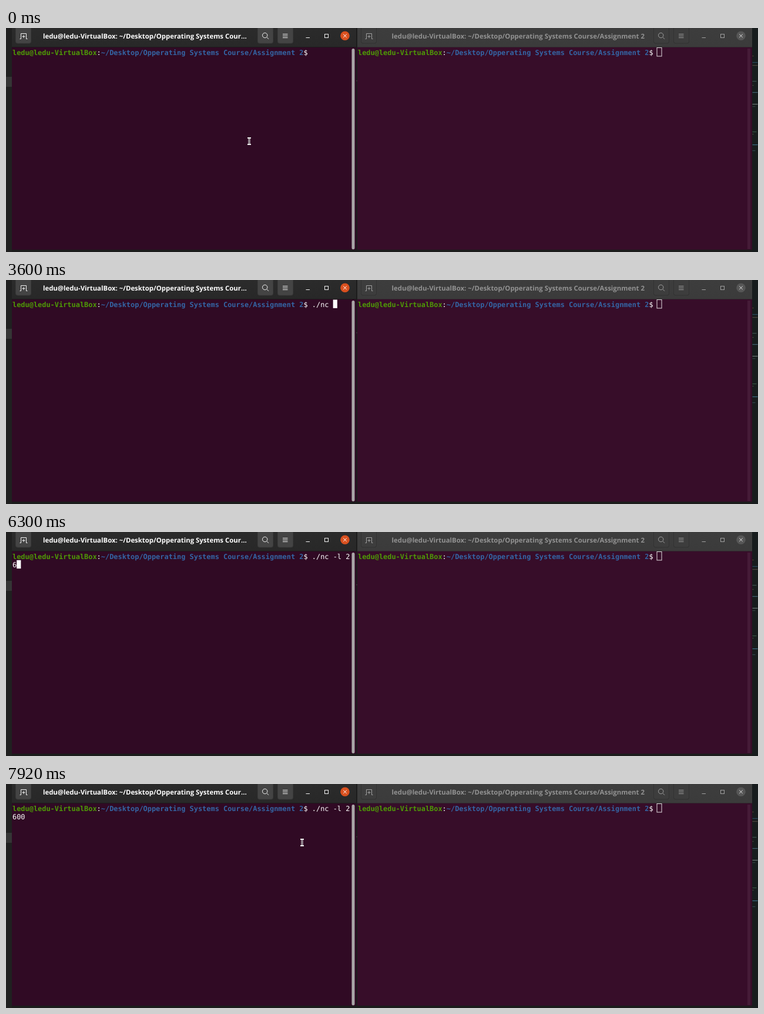
These frames come from a looping animation (1280x381 px, 8000 ms). An HTML page with a canvas:

```html
<!DOCTYPE html>
<html lang="en">
<head>
<meta charset="utf-8">
<title>Terminals</title>
<style>
html, body { margin: 0; width: 100%; height: 100%; overflow: hidden; background: #1c1c1c; }
canvas { display: block; }
</style>
</head>
<body>
<canvas id="stage" width="1280" height="381"></canvas>
<script>
const ctx = document.getElementById('stage').getContext('2d');
const LOOP = 8000;
const CELL_W = 7.18, CELL_H = 14.36, ROW_TOP = 33.5;
const MONO = '11.92px "DejaVu Sans Mono", monospace';
const HOST = 'ledu@ledu-VirtualBox';
const COURSE = '~/Desktop/Opperating Systems Cour';
const FOLDER = COURSE + 'se/Assignment 2';
const FOLDER_COL = HOST.length + 1;
const DOLLAR_COL = FOLDER_COL + FOLDER.length;
const INPUT_COL = DOLLAR_COL + 2;
const COMMAND = './nc -l 2600';
const COLUMNS = 80;

// typed: characters entered so far, cursor: block visible, pointer: I-beam centre
const STEPS = [
  { at: 0, typed: 0, cursor: false, pointer: [414, 192] },
  { at: 180, typed: 1, cursor: true, pointer: null },
  { at: 360, typed: 2 },
  { at: 1080, cursor: false },
  { at: 1620, typed: 3, cursor: true },
  { at: 1980, typed: 5 },
  { at: 2880, cursor: false },
  { at: 3600, cursor: true },
  { at: 4500, typed: 7 },
  { at: 4860, typed: 8 },
  { at: 5760, typed: 9 },
  { at: 6300, typed: 10 },
  { at: 6480, typed: 11 },
  { at: 6660, typed: 12 },
  { at: 6840, entered: true },
  { at: 7560, pointer: [422, 192] },
  { at: 7740, cursor: false, pointer: [448, 183] },
  { at: 7920, pointer: [504, 99] }
];

const ACTIVE = {
  barTop: '#2b2b2b', barBottom: '#282828', rim: '#1d1a1c', edge: '#3a3a3a', button: '#444444',
  ink: '#f2f2f2', title: '#ffffff', close: '#d9501f', cross: '#ffffff'
};
const INACTIVE = {
  barTop: '#3d3d3d', barBottom: '#3b3b3b', rim: '#312b2f', edge: '#323232', button: '#3d3d3d',
  ink: '#a0a0a0', title: '#929292', close: '#565656', cross: '#dddddd'
};

function stateAt(time) {
  return Object.assign({}, ...STEPS.filter(step => step.at <= time));
}

function rect(x, y, w, h, color) {
  ctx.fillStyle = color;
  ctx.fillRect(x, y, w, h);
}

function rounded(x, y, w, h, r, color) {
  ctx.fillStyle = color;
  ctx.beginPath();
  ctx.roundRect(x, y, w, h, r);
  ctx.fill();
}

function line(color, ...points) {
  ctx.strokeStyle = color;
  ctx.lineWidth = 1;
  ctx.beginPath();
  points.forEach(([x, y], i) => i ? ctx.lineTo(x, y) : ctx.moveTo(x, y));
  ctx.stroke();
}

function disc(x, y, r, color) {
  ctx.fillStyle = color;
  ctx.beginPath();
  ctx.arc(x, y, r, 0, Math.PI * 2);
  ctx.fill();
}

function button(x, look) {
  rounded(x, 0, 27, 26.5, [0, 0, 4, 4], look.edge);
  rounded(x + 1, 0, 25, 25.5, [0, 0, 3, 3], look.button);
}

function titleBar(x, width, tools, title, titleEnd, look) {
  const bar = ctx.createLinearGradient(0, 0, 0, 32);
  bar.addColorStop(0, look.barTop);
  bar.addColorStop(1, look.barBottom);
  rect(x, 0, width, 32, bar);
  rect(x, 32, width, 1, look.rim);

  const tab = x + 19.5, ink = look.ink;
  button(x + 6, look);
  line(ink, [tab - 6, 18.5], [tab - 4, 18.5], [tab - 4, 9.5], [tab + 5, 9.5], [tab + 5, 18.5], [tab + 7, 18.5]);
  line(ink, [tab + .5, 12], [tab + .5, 17]);
  line(ink, [tab - 2, 14.5], [tab + 3, 14.5]);

  button(tools, look);
  ctx.strokeStyle = ink;
  ctx.beginPath();
  ctx.arc(tools + 12.7, 12.5, 4.2, 0, Math.PI * 2);
  ctx.stroke();
  line(ink, [tools + 15.8, 15.6], [tools + 19, 18.8]);

  button(tools + 34, look);
  for (const y of [10.5, 13.5, 16.5]) line(ink, [tools + 43, y], [tools + 51.5, y]);

  line(ink, [tools + 82.5, 16.5], [tools + 89, 16.5]);
  ctx.strokeRect(tools + 114.5, 10.5, 6, 6);

  const close = tools + 149;
  disc(close, 13.3, 7.8, look.close);
  line(look.cross, [close - 2.8, 10.5], [close + 2.8, 16.1]);
  line(look.cross, [close + 2.8, 10.5], [close - 2.8, 16.1]);

  ctx.font = 'bold 11.4px "Open Sans", "Noto Sans", sans-serif';
  ctx.textAlign = 'right';
  ctx.fillStyle = look.title;
  ctx.fillText(title, titleEnd, 17.6);
  ctx.textAlign = 'left';
}

// Terminal text sits on a fixed cell grid and wraps after the last column.
function cellAt(left, index) {
  return [left + index % COLUMNS * CELL_W, ROW_TOP + Math.floor(index / COLUMNS) * CELL_H];
}

function cells(text, left, col, color, weight = '') {
  ctx.font = weight + ' ' + MONO;
  ctx.fillStyle = color;
  [...text].forEach((char, i) => {
    const [x, y] = cellAt(left, col + i);
    ctx.fillText(char, x, y + 12.2);
  });
}

function prompt(left) {
  cells(HOST, left, 0, '#4e9a06', 'bold');
  cells(':', left, HOST.length, '#ffffff');
  cells(FOLDER, left, FOLDER_COL, '#3465a4', 'bold');
  cells('$', left, DOLLAR_COL, '#ffffff');
}

function editorEdges() {
  rect(0, 0, 1280, 381, '#1c1c1c');
  rect(0, 0, 10, 381, '#202020');
  rect(0, 83, 10, 17, '#353535');
  rect(1270, 0, 10, 381, '#171c1d');
  const specks = [
    [47, 2, '#57402f'], [58, 9, '#2a4a5e'], [63, 9, '#4f463f'], [90, 7, '#3c504d'],
    [97, 2, '#4a473c'], [109, 9, '#436272'], [129, 9, '#6c7674'], [133, 5, '#334040'],
    [176, 7, '#375343'], [180, 2, '#45473f'], [198, 9, '#3b6a82'], [208, 5, '#30454d']
  ];
  for (const [y, w, color] of specks) rect(1270.5, y, w, 1.2, color);
}

function pointer([x, y]) {
  rect(x - 3, y - 6, 6, 2, '#eeeeee');
  rect(x - 3, y + 5, 6, 2, '#eeeeee');
  rect(x - 1.5, y - 6, 3, 13, '#eeeeee');
  rect(x - .5, y - 4, 1, 9, '#241020');
}

function draw(time) {
  const state = stateAt(time);
  editorEdges();

  rect(10, 32, 586, 345, '#300a24');
  titleBar(10, 586, 428, HOST + ': ' + COURSE + '...', 409.7, ACTIVE);
  rounded(588.5, 35, 5, 341.5, 2.5, '#aaa6a8');

  rect(598, 32, 672, 345, '#370d29');
  titleBar(598, 672, 1102, HOST + ': ' + FOLDER, 1087, INACTIVE);
  rect(1262, 35, 5, 341, '#451b37');
  rect(596.5, 89, 1, 1.5, '#54464e');

  prompt(11);
  prompt(599);
  cells(COMMAND.slice(0, state.typed), 11, INPUT_COL, '#ffffff');

  ctx.strokeStyle = '#e4dfe2';
  ctx.lineWidth = 1;
  ctx.strokeRect(1108, 33.5, 8, 14.5);

  if (state.cursor) {
    const index = state.entered ? COLUMNS * 2 : INPUT_COL + state.typed;
    rect(...cellAt(11, index), CELL_W, CELL_H, '#ffffff');
  }
  if (state.pointer) pointer(state.pointer);
}

ctx.textRendering = 'geometricPrecision';
const start = performance.now();
function tick() {
  draw((performance.now() - start) % LOOP);
  requestAnimationFrame(tick);
}
tick();
</script>
</body>
</html>
```
